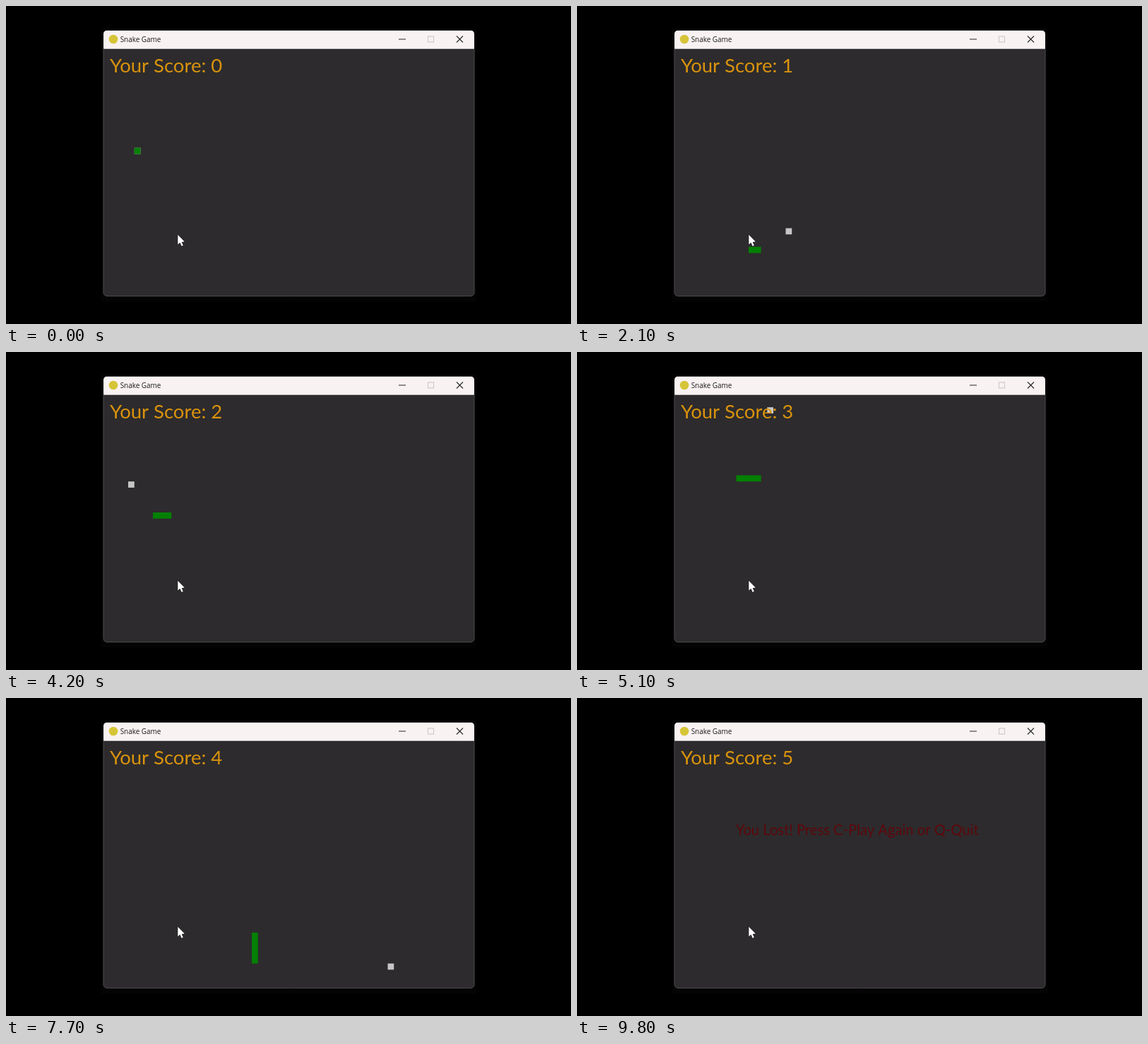
Recreate the animation shown at these times as an HTML page with a canvas. Size 800 px wide and 450 px high, loop 10000 ms.

```html
<!DOCTYPE html>
<html lang="en">
<head>
<meta charset="utf-8">
<title>Snake Game</title>
<style>
  html, body { margin: 0; width: 100%; height: 100%; overflow: hidden; background: #000; }
  canvas { display: block; width: 800px; height: 450px; }
</style>
</head>
<body>
<canvas id="stage" width="800" height="450"></canvas>
<script>
const ctx = document.getElementById('stage').getContext('2d');

const LOOP = 10000, TICK = 100, SPEED = 21.02;
const CELL = 8.75, LEFT = 138, TOP = 60.7, COLS = 60;
const WIN = { x: 138, y: 34.5, w: 525, h: 376.2, r: 5 };

// The steering: direction and number of cells
const ROUTE = 'U10 R4 D26 R7 U6 R5 D5 L3 U12 L14 U6 R11 U11 R9 D35 R22 U1 R14';
const DIRS = { U: [0, -1], D: [0, 1], L: [-1, 0], R: [1, 0] };
const MEALS = [[5, 16], [18, 29], [4, 14], [15, 2], [46, 36]];

const path = [[5, 16]];
for (const leg of ROUTE.split(' ')) {
  const [dx, dy] = DIRS[leg[0]];
  for (let i = +leg.slice(1); i > 0; i--) {
    const [x, y] = path[path.length - 1];
    path.push([x + dx, y + dy]);
  }
}

// Step at which each meal is reached, searched in order
const eaten = [];
for (const [mx, my] of MEALS) {
  const from = eaten.length ? eaten[eaten.length - 1] : 0;
  eaten.push(path.findIndex(([x, y], i) => i >= from && x === mx && y === my));
}
const crash = path.findIndex(([x]) => x >= COLS);

function cells(list, color) {
  ctx.beginPath();
  for (const [x, y] of list) ctx.rect(LEFT + x * CELL, TOP + y * CELL, CELL, CELL);
  ctx.fillStyle = color;
  ctx.fill();
}

function label(str, x, y, font, color) {
  ctx.font = font;
  ctx.fillStyle = color;
  ctx.fillText(str, x, y);
}

function lines(points, color) {
  ctx.beginPath();
  for (const [x1, y1, x2, y2] of points) {
    ctx.moveTo(x1, y1);
    ctx.lineTo(x2, y2);
  }
  ctx.strokeStyle = color;
  ctx.lineWidth = 1.1;
  ctx.stroke();
}

function drawWindow() {
  ctx.fillStyle = '#000';
  ctx.fillRect(0, 0, 800, 450);
  ctx.fillStyle = '#040404';
  ctx.fillRect(135, 31, 531, 387);

  ctx.save();
  ctx.beginPath();
  ctx.roundRect(WIN.x, WIN.y, WIN.w, WIN.h, WIN.r);
  ctx.clip();
  ctx.fillStyle = '#2d2b2d';
  ctx.fillRect(WIN.x, WIN.y, WIN.w, WIN.h);
  ctx.fillStyle = '#f8f2f2';
  ctx.fillRect(WIN.x, WIN.y, WIN.w, TOP - WIN.y);
  ctx.restore();

  // Thin frame around the dark area
  ctx.beginPath();
  ctx.moveTo(WIN.x, TOP);
  ctx.arcTo(WIN.x, 410.5, WIN.x + WIN.r, 410.5, WIN.r);
  ctx.arcTo(663, 410.5, 663, 400, WIN.r);
  ctx.lineTo(663, TOP);
  ctx.strokeStyle = '#4c4a4c';
  ctx.lineWidth = 1;
  ctx.stroke();

  ctx.beginPath();
  ctx.arc(152, 47, 6.3, 0, Math.PI * 2);
  ctx.fillStyle = '#d6c537';
  ctx.fill();
  label('Snake Game', 161.7, 50.8, '9.9px "Open Sans", "Noto Sans", sans-serif', '#1c1a1b');

  lines([[556, 47, 566, 47], [638, 42.5, 647, 51.5], [647, 42.5, 638, 51.5]], '#2a2829');
  ctx.strokeStyle = '#cdc7c8';
  ctx.strokeRect(597.5, 43, 8, 8);
}

function drawCursor() {
  ctx.beginPath();
  ctx.moveTo(243.3, 323.8);
  ctx.lineTo(243.3, 337.6);
  ctx.lineTo(246.4, 334.8);
  ctx.lineTo(248.5, 339.7);
  ctx.lineTo(250.8, 338.7);
  ctx.lineTo(248.7, 333.9);
  ctx.lineTo(252.8, 333.6);
  ctx.closePath();
  ctx.strokeStyle = '#161516';
  ctx.lineWidth = 1;
  ctx.stroke();
  ctx.fillStyle = '#fff';
  ctx.fill();
}

function draw(ms) {
  const tick = Math.floor(ms / TICK) * TICK;
  const step = Math.round(tick / 1000 * SPEED);
  const score = eaten.filter(n => n < step).length;

  drawWindow();
  if (step < crash) {
    if (score < MEALS.length) cells([MEALS[score]], '#c6c6c6');
    cells(path.slice(Math.max(0, step - score), step + 1), '#048004');
  } else {
    label('You Lost! Press C-Play Again or Q-Quit', 225, 193.8,
      '20.2px Lato, Roboto, sans-serif', '#5e080c');
  }
  label('Your Score: ' + score, 147, 93.6, '27.5px Lato, Roboto, sans-serif', '#d9930c');
  drawCursor();
}

const start = performance.now();
function frame() {
  draw((performance.now() - start) % LOOP);
  requestAnimationFrame(frame);
}
frame();
</script>
</body>
</html>
```
